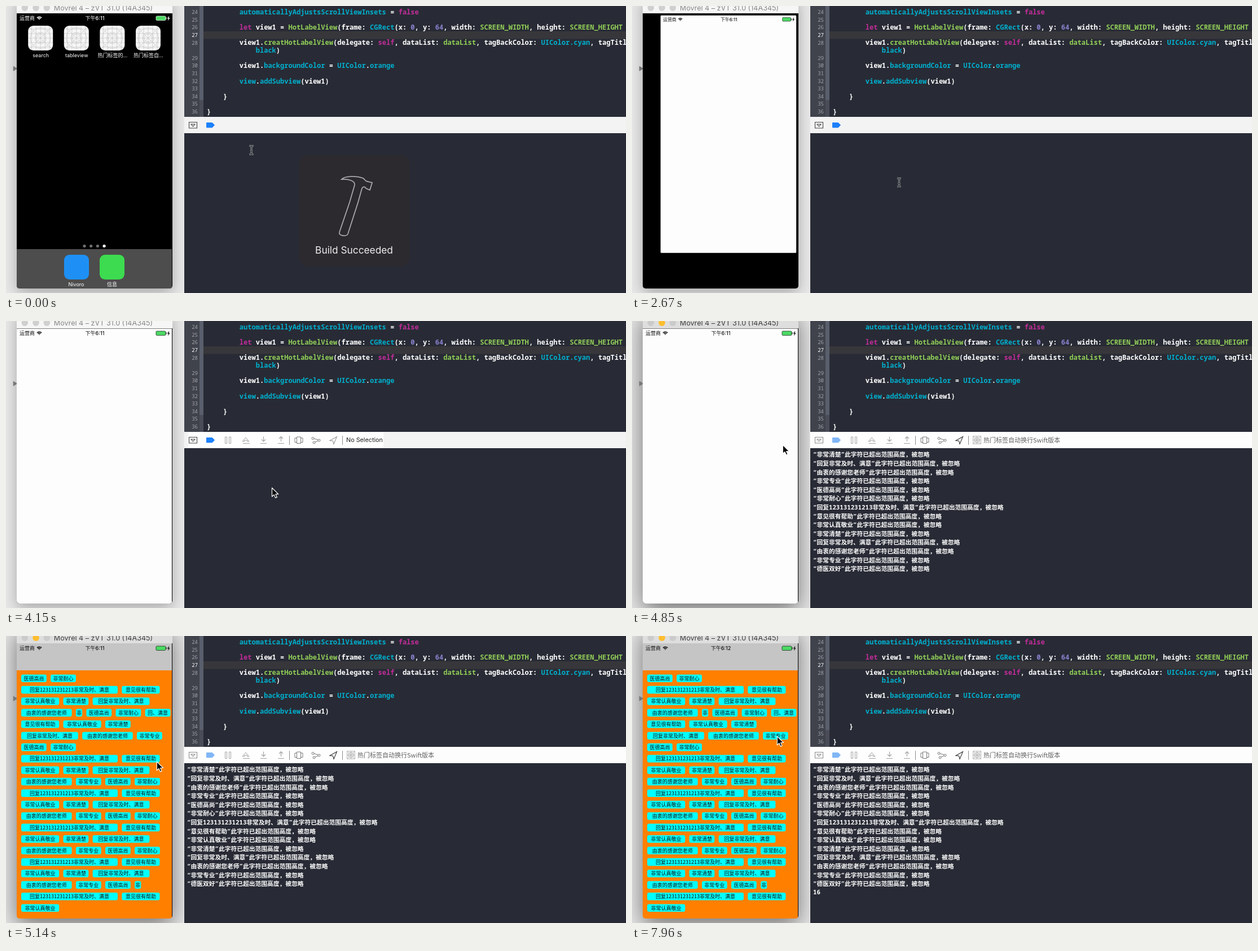
An HTML page with a canvas that plays this animation: 1099x510 px, repeating every 8 s.

```html
<!DOCTYPE html>
<html lang="zh-CN">
<head>
<meta charset="utf-8">
<style>
html, body { margin: 0; width: 100%; height: 100%; overflow: hidden; background: #282b35; }
canvas { display: block; }
</style>
</head>
<body>
<canvas id="stage" width="1099" height="510"></canvas>
<script>
const ctx = document.getElementById('stage').getContext('2d');
const LOOP = 8000;
const SANS = 'Inter, "Noto Sans CJK SC", sans-serif';
const CJK = '"Noto Sans CJK SC", sans-serif';
const MONO = '"Noto Sans Mono", "Noto Sans CJK SC", monospace';
const DARK = '#282b35';

const bursts = [[140, 730, 5], [1030, 1930, 7], [2080, 3120, 8], [3270, 3710, 4], [4000, 4150, 2],
  [4320, 4680, 3], [4850, 5000, 2], [5140, 6040, 7], [6190, 6480, 3], [6780, 7220, 4], [7520, 7960, 4]];
const ticks = [0];
for (const [a, b, n] of bursts)
  for (let i = 0; i < n; i++) ticks.push(Math.floor((a + (b - a) * i / (n - 1)) / 10) * 10);

const pointer = [[0, 435, 256], [880, 435, 256], [1930, 456, 300], [2820, 477, 316], [3120, 490, 311],
  [3560, 481, 303], [4150, 471.5, 296.5], [4850, 267.3, 220.3], [5140, 267.3, 223.3], [6040, 184, 171],
  [6480, 191, 172], [7000, 212, 172], [7220, 204, 173], [7960, 257.3, 178.3]];

const palette = { w: '#ffffff', c: '#00b0cf', m: '#c42d9b', g: '#92cf58', p: '#8b82d0' };
// row, column, then alternating colour key and text
const code = [
  [0, 8, 'c|automaticallyAdjustsScrollViewInsets|w| = |m|false'],
  [2, 8, 'm|let|w| view1 = |g|HotLabelView|w|(frame: |c|CGRect|w|(x: |p|0|w|, y: |p|64|w|, width: |g|SCREEN_WIDTH|w|, height: |g|SCREEN_HEIGHT|w| -'],
  [4, 8, 'w|view1.|g|creatHotLabelView|w|(delegate: |m|self|w|, dataList: |g|dataList|w|, tagBackColor: |c|UIColor.cyan|w|, tagTitleColor'],
  [5, 12, 'c|black|w|)'],
  [7, 8, 'w|view1.|c|backgroundColor|w| = |c|UIColor|w|.|c|orange'],
  [9, 8, 'c|view|w|.|c|addSubview|w|(view1)'],
  [11, 4, 'w|}'],
  [13, 0, 'w|}']
];

const words = { a: '医德高尚', b: '非常耐心', c: '回复123131231213非常及时、满意', d: '意见很有帮助', e: '非常认真敬业',
  f: '非常清楚', g: '回复非常及时、满意', h: '由衷的感谢您老师', i: '非', j: '回、满意', k: '非常专业', z: '德医双好' };
const tagRows = 'ab cd efg hiabj def ghk ab cd efg hkab cd efg hkab cd efg hkab cd efg hkai cd e'.split(' ');
const logged = 'fghkabcdefghkz';

function text(str, x, y, size, color, font = SANS, align = 'left', weight = 400) {
  ctx.font = `${weight} ${size}px ${font}`;
  ctx.textAlign = align;
  ctx.fillStyle = color;
  ctx.fillText(str, x, y + size * 0.37);
}
function rect(x, y, w, h, color) {
  ctx.fillStyle = color;
  ctx.fillRect(x, y, w, h);
}
function rounded(x, y, w, h, r, color) {
  ctx.beginPath();
  ctx.roundRect(x, y, w, h, r);
  ctx.fillStyle = color;
  ctx.fill();
}
function disc(x, y, r, color) {
  ctx.beginPath();
  ctx.arc(x, y, r, 0, 7);
  ctx.fillStyle = color;
  ctx.fill();
}
function outline(d, color, width = 1, fill) {
  const path = new Path2D(d);
  if (fill) { ctx.fillStyle = fill; ctx.fill(path); }
  ctx.strokeStyle = color;
  ctx.lineWidth = width;
  ctx.stroke(path);
}
function placed(alpha, draw) {
  ctx.save();
  ctx.globalAlpha *= Math.max(0, Math.min(1, alpha));
  draw();
  ctx.restore();
}

function editor() {
  rect(316, 0, 783, 510, DARK);
  rect(316, 0, 27, 197, '#40434c');
  rect(343, 0, 7, 167, '#5a5f6d');
  rect(343, 167, 7, 30, '#4a4d57');
  rect(350, 45, 749, 13.5, '#37373b');
  for (let row = 0; row < 14; row++) {
    if (row === 5) continue;
    const n = 24 + row - (row > 5);
    text(n, 340, 10.7 + 13.62 * row, 9, n === 27 ? '#ffffff' : '#a0a3ab', MONO, 'right');
  }
  for (const [row, col, line] of code) {
    let x = 356 + col * 7.227;
    const parts = line.split('|');
    for (let i = 0; i < parts.length; i += 2) {
      text(parts[i + 1], x, 10.5 + 13.62 * row, 12.04, palette[parts[i]], MONO, 'left', 560);
      x += parts[i + 1].length * 7.227;
    }
  }
}

function debugBar(t, active) {
  rect(316, 197, 783, 29, active ? '#fdfdfd' : '#f3f3f3');
  if (t >= 2820) rect(323, 198, t >= 2970 ? 346 : 165, 27, '#fefefe');
  const ink = active ? '#8c8c8c' : '#454545', soft = '#a2a2a2';
  outline('M324.5 206.5h14v10.5h-14z M328 210h7l-3.5 4z', ink, 1.1);
  const blue = active ? '#80b6f6' : '#1c80fa';
  outline('M355.5 207.5h10l4 4.2-4 4.2h-10z', blue, 1, blue);
  if (t < 2970) return;
  outline('M388.5 206h3v11.5h-3z M395.5 206h3v11.5h-3z', soft);
  outline('M419 214l6-7 6 7h-3.5v-2h-5v2z M420 217.5h12', soft);
  outline('M456.5 205.5v8 M453 210.5l3.5 3.5 3.5-3.5 M451 217.5h11', soft, 1.2);
  outline('M487.5 214v-8 M484 209l3.5-3.5 3.5 3.5 M482 217.5h11', soft, 1.2);
  rect(502, 204, 1, 16, '#8a8a8a');
  outline('M515.5 206h7v11.5h-7z M515 208h-3v7.5h3 M523 208h3v7.5h-3', '#777');
  outline('M546 208.5a2 2 0 1 1-4 0a2 2 0 1 1 4 0z M557 212a2 2 0 1 1-4 0a2 2 0 1 1 4 0z M548 216a2 2 0 1 1-4 0a2 2 0 1 1 4 0z M546 209l7 2 M548 215l5-2', '#777');
  outline('M574 212.5l12.5-7-5.5 13-1.5-5.5z', active ? '#333' : '#999', 1.1);
  rect(596, 204, 1, 16, '#8a8a8a');
  if (active) {
    outline('M604.5 204.5h14v14h-14z M604.5 211.5h14 M611.5 204.5v14 M604.5 204.5l14 14 M618.5 204.5l-14 14', '#bdbdbd', 1, '#f1f1f1');
    outline('M616 211.5a4.5 4.5 0 1 1-9 0a4.5 4.5 0 1 1 9 0z', '#aaa');
    text('热门标签自动换行Swift版本', 623, 211.5, 11, '#606060', CJK);
  } else text('No Selection', 603, 211.5, 10.8, '#222');
}

function log(t) {
  [...logged].forEach((key, i) =>
    text(`“${words[key]}”此字符已超出范围高度，被忽略`, 321, 237.3 + 15.62 * i, 10.75, '#fff', MONO, 'left', 700));
  if (t >= 7810) text('16', 321, 454.5, 10.9, '#fff', MONO, 'left', 700);
}

function buildNotice() {
  rounded(520, 266, 195, 196, 14, '#2c2a2e');
  outline('M595 308C602 301 622 302 633 306C636 308 637 312 641 312L649 314L645 327L638 324C636 320 633 321 631 324' +
    'L624 349L606 405C604 410 589 409 591 402L609 349L618 318C619 311 608 307 595 308z', '#a8a7aa', 1.8);
  text('Build Succeeded', 617, 433.5, 17.3, '#eeeeef', SANS, 'center');
}

function statusBar(color, minute) {
  text('运营商', 24, 21.7, 9, color, CJK);
  ctx.lineWidth = 1.5;
  ctx.strokeStyle = color;
  for (const r of [1, 3.4, 5.8]) {
    ctx.beginPath();
    ctx.arc(59, 25, r, -2.36, -0.78);
    ctx.stroke();
  }
  text('下午6:' + minute, 157.5, 21.7, 9, color, SANS, 'center', 500);
  rounded(266, 18, 17, 7.5, 1.5, '#4cd964');
  ctx.lineWidth = 0.7;
  ctx.stroke();
  rect(283.5, 20, 1, 3.5, color);
  outline('M289 18l-3 4.3h2l-.7 3.4 3-4.3h-2z', color, 0.3, color);
}

function templateIcon(cx, label) {
  const cy = 57;
  ctx.save();
  ctx.beginPath();
  ctx.roundRect(cx - 22, cy - 22, 44, 44, 9.5);
  ctx.fillStyle = '#f6f6f6';
  ctx.fill();
  ctx.clip();
  ctx.strokeStyle = '#bcbcbc';
  ctx.lineWidth = 0.6;
  ctx.beginPath();
  for (const o of [-16, -8, 0, 8, 16]) {
    ctx.moveTo(cx + o, cy - 22); ctx.lineTo(cx + o, cy + 22);
    ctx.moveTo(cx - 22, cy + o); ctx.lineTo(cx + 22, cy + o);
  }
  for (const s of [-1, 1]) { ctx.moveTo(cx - 22, cy - 22 * s); ctx.lineTo(cx + 22, cy + 22 * s); }
  for (const r of [7, 10, 18]) { ctx.moveTo(cx + r, cy); ctx.arc(cx, cy, r, 0, 6.283); }
  ctx.stroke();
  ctx.restore();
  text(label, cx + 0.5, 87.5, 9, '#fff', SANS, 'center');
}

function home() {
  ['search', 'tableview', '热门标签的…', '热门标签自…'].forEach((label, i) => templateIcon(61.2 + 63.6 * i, label));
  for (let i = 0; i < 4; i++) disc(139 + 11.7 * i, 426.5, 2.6, i === 3 ? '#fff' : '#707070');
  rect(19, 432, 275, 70, '#4d4d4d');
  rounded(103, 442, 44, 44, 9.5, '#1e90f5');
  rounded(166, 442, 44, 44, 9.5, '#3ddb4f');
  text('Nivoro', 124.5, 494.5, 9, '#fff', SANS, 'center');
  text('信息', 188, 494.5, 9, '#fff', CJK, 'center');
}

function tagCloud() {
  rect(19, 13, 275, 48, '#c5c5c5');
  rect(19, 61, 275, 441, '#ff8000');
  tagRows.forEach((row, i) => {
    let x = 27;
    const y = 75.2 + 20.4 * i;
    for (const key of row) {
      const word = words[key], digits = word.replace(/\D/g, '').length;
      const w = 11.2 * (word.length - digits) + 5.85 * digits;
      rounded(x, y - 6.8, w, 13.6, 3, '#00ffff');
      text(word, x + w / 2, y, 9, '#111', CJK, 'center');
      x += w + 7.3;
    }
  });
}

function phone(t, active) {
  rect(0, 0, 316, 510, '#e9e8e8');
  ctx.save();
  ctx.beginPath();
  ctx.rect(0, 0, 315, 510);
  ctx.clip();
  ctx.shadowColor = active ? 'rgba(0,0,0,.52)' : 'rgba(0,0,0,.28)';
  ctx.shadowBlur = active ? 42 : 26;
  ctx.shadowOffsetY = active ? 12 : 8;
  rounded(19, -18, 276, 520, 5, active ? '#dedede' : '#f6f6f6');
  ctx.restore();
  outline('M13 107l7 4.2-7 4.2z', '#777', 0.5, '#777');

  [33.3, 53, 72.3].forEach((x, i) => disc(x, 3.2, 5.8, active ? (i === 1 ? '#fdbe2f' : '#cbcbcb') : '#d0d0d0'));
  text('Movrel 4 – zVT 31.0 (14A345)', 172.5, 3.6, 12.6, active ? '#3c3c3c' : '#858585', SANS, 'center');

  ctx.save();
  ctx.beginPath();
  ctx.roundRect(19, 13, 276, 489, [0, 0, 5, 5]);
  ctx.clip();
  rect(19, 13, 276, 489, '#000');
  const u = Math.max(0, Math.min(1, (t - 2220) / 960));
  const p = 1 - (1 - u) ** 3;
  const mix = (a, b) => a + (b - a) * p;
  const x = mix(230, 19), y = mix(35, 13.5), w = mix(45, 275), h = mix(45, 488.5);
  placed(1 - p * 1.3, () => {
    ctx.translate(x, y);
    ctx.scale(w / 45, w / 45);
    ctx.translate(-230, -35);
    // At rest the zoom is the identity
    home();
  });
  if (p === 0) statusBar('#fff', 11);
  else placed(p * 2.5, () => {
    rounded(x, y, w, h, 9 * (1 - p), '#fdfdfd');
    ctx.translate(x, y);
    ctx.scale(w / 275, h / 488.5);
    ctx.translate(-19, -13.5);
    if (t >= 5000) placed(t < 5140 ? 0.8 : 1, tagCloud);
    statusBar('#111', t >= 6190 ? 12 : 11);
  });
  ctx.restore();
}

function drawPointer(t) {
  let i = 1;
  while (i < pointer.length - 1 && pointer[i][0] < t) i++;
  const [t0, x0, y0] = pointer[i - 1], [t1, x1, y1] = pointer[i];
  const k = (t - t0) / (t1 - t0);
  ctx.save();
  ctx.translate(x0 + (x1 - x0) * k, y0 + (y1 - y0) * k);
  ctx.lineJoin = 'round';
  if (t < 3560) {
    const beam = 'M-3.5-7.5q3.5 0 3.5 2v11q0 2-3.5 2 M3.5-7.5q-3.5 0-3.5 2 M3.5 7.5q-3.5 0-3.5-2 M-2 2h4';
    outline(beam, '#b4b5b8', 2.8);
    outline(beam, '#17181c', 1.1);
  } else outline('M0 0v15.5l3.6-3.3 2.5 5.6 2.7-1.2-2.5-5.4h5z', '#fff', 1.2, '#000');
  ctx.restore();
}

function frame(now) {
  const raw = now % LOOP;
  const t = ticks.filter(tick => tick <= raw + 0.5).pop();
  const active = t >= 4500;
  phone(t, active);
  editor();
  debugBar(t, active);
  if (active) log(t);
  if (t < 730) placed(1 - t / 730, buildNotice);
  drawPointer(t);
}

const start = performance.now();
(function loop() {
  frame(Math.max(0, performance.now() - start));
  requestAnimationFrame(loop);
})();
</script>
</body>
</html>
```
